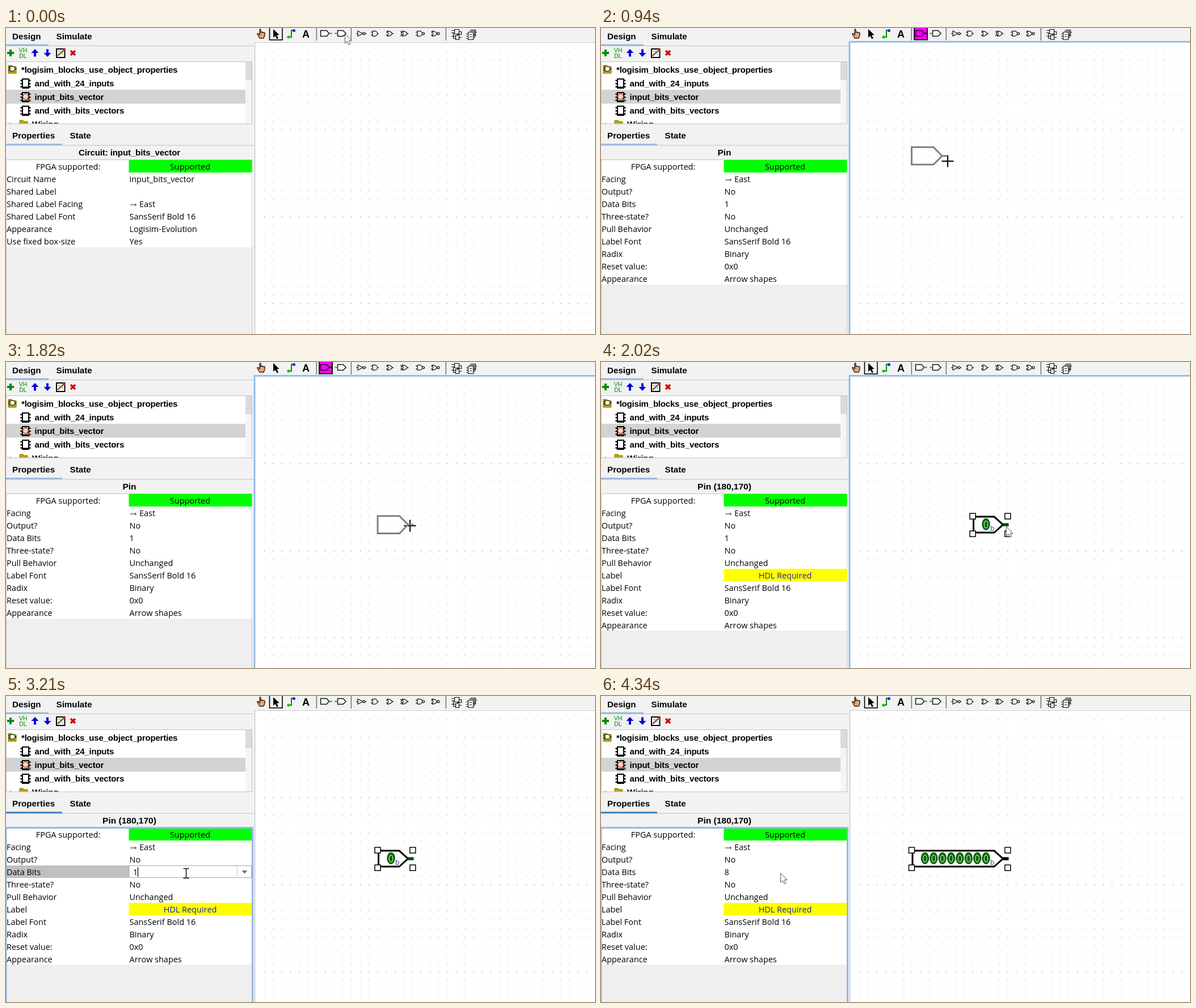
Recreate the animation shown at these times as an HTML page with a canvas. Size 1038 px wide and 540 px high, loop 6340 ms.

```html
<!DOCTYPE html>
<html lang="en">
<head>
<meta charset="utf-8">
<title>Pin data bits</title>
<style>
html, body { margin: 0; width: 100%; height: 100%; overflow: hidden; background: #f2f2f2; }
canvas { display: block; }
</style>
</head>
<body>
<canvas id="stage" width="1038" height="540"></canvas>
<script>
const c = document.getElementById('stage').getContext('2d');
const LOOP = 6340, GRID = 15.36, OX = 440, OY = 26, ROW = 21.95;
const PANEL = '#f2f2f2', LINE = '#c2c2c2', FOCUS = '#8fb9e6', GREEN = '#00c800';
const BOLD = '"Liberation Sans", Arial, sans-serif';
const BODY = '14.45px "Open Sans", "Noto Sans", sans-serif';

// Times of the state changes
const T = { hover: 430, tool: 480, enter: 810, place: 1950, arrow: 2020,
  focus: 3140, edit: 3210, erase: 3690, type: 4020, commit: 4280, done: 4340 };

// Pointer positions: time, x, y
const POINTER = [
  [0, 597, 10], [80, 588, 9], [150, 576, 7], [210, 567, 6], [280, 563, 4.5],
  [750, 564, 20], [810, 572, 78], [880, 590, 160], [940, 611, 235], [1010, 621, 268],
  [1080, 626, 282], [1150, 628, 288], [1220, 628, 289], [1290, 627, 289], [1360, 626, 289],
  [1500, 630, 289], [1570, 640, 289], [1630, 658, 289], [1700, 678, 289], [1760, 697, 289],
  [1820, 712, 289], [1890, 714, 290],
  [2610, 705, 291], [2680, 660, 295], [2740, 590, 301], [2810, 500, 308], [2880, 410, 314],
  [2940, 345, 318], [3010, 324, 315], [3080, 317, 313], [4280, 316, 312]
];

const CIRCUIT = [['Circuit Name', 'input_bits_vector'], ['Shared Label', ''],
  ['Shared Label Facing', '> East'], ['Shared Label Font', 'SansSerif Bold 16'],
  ['Appearance', 'Logisim-Evolution'], ['Use fixed box-size', 'Yes']];

function pinRows(placed, bits) {
  const rows = [['Facing', '> East'], ['Output?', 'No'], ['Data Bits', bits],
    ['Three-state?', 'No'], ['Pull Behavior', 'Unchanged']];
  if (placed) rows.push(['Label', 'HDL Required']);
  return rows.concat([['Label Font', 'SansSerif Bold 16'], ['Radix', 'Binary'],
    ['Reset value:', '0x0'], ['Appearance', 'Arrow shapes']]);
}

function box(x, y, w, h, fill) {
  c.fillStyle = fill;
  c.fillRect(x, y, w, h);
}
function frame(x, y, w, h, color, width = 1) {
  c.strokeStyle = color;
  c.lineWidth = width;
  c.strokeRect(x, y, w, h);
}
function text(s, x, y, font = BODY, color = '#000', align = 'left', gap = 0) {
  c.font = font;
  c.fontKerning = 'none';
  c.fillStyle = color;
  c.textAlign = align;
  c.letterSpacing = gap + 'px';
  c.fillText(s, x, y);
}
function shape(d, stroke, width = 1, fill, x = 0, y = 0) {
  const p = new Path2D(d);
  c.save();
  c.translate(x, y);
  if (fill) { c.fillStyle = fill; c.fill(p); }
  if (stroke) { c.strokeStyle = stroke; c.lineWidth = width; c.stroke(p); }
  c.restore();
}
function disc(x, y, rx, ry, fill, stroke, width = 1) {
  c.beginPath();
  c.ellipse(x, y, rx, ry, 0, 0, 7);
  if (fill) { c.fillStyle = fill; c.fill(); }
  if (stroke) { c.strokeStyle = stroke; c.lineWidth = width; c.stroke(); }
}

function chip(x, y) {
  for (const k of [2, 7.5, 13]) box(x - 2.5, y + k, 18, 2.4, '#000');
  box(x, y - .5, 13, 18, '#000');
  box(x + 2, y + 1.5, 9, 12.5, '#fff');
}

function editBar() {
  shape('M8 38V50M2 44H14', '#008a00', 4);
  const small = '10.5px ' + BOLD;
  text('VH', 30, 43, small, '#008a00', 'center');
  text('DL', 30, 52.5, small, '#008a00', 'center');
  shape('M0 -7L6.5 0H2V6.5H-2V0H-6.5Z', null, 1, '#0000e0', 51, 44);
  shape('M0 7L6.5 0H2V-6.5H-2V0H-6.5Z', null, 1, '#0000e0', 73, 44);
  box(89, 37, 14.5, 15, '#fff');
  frame(89, 37, 14.5, 15, '#000', 2);
  shape('M91 49L102 39', '#7a5a30', 2.4);
  shape('M91 41Q97 40 100 48', '#60a060', 1);
  shape('M101 37L104 40', '#e02020', 2.5);
  shape('M114 40L122 48M122 40L114 48', '#d40000', 3.6);
}

function tree() {
  box(0, 59, 434, 110, '#fff');
  c.save();
  c.beginPath();
  c.rect(0, 59, 422, 110);
  c.clip();
  box(0, 109, 422, 24.5, '#d3d3d3');
  const font = 'bold 15px ' + BOLD;
  shape('M4 66H10L12 68H18V80H4Z', '#8a7a00', 1, '#b8a400');
  shape('M7 68H12A4 4 0 0 1 12 76H7ZM16 72H19M4 70H7M4 74H7', '#000', 1.2, '#fff');
  text('*logisim_blocks_use_object_properties', 27, 79, font, '#000', 'left', -.2);
  ['and_with_24_inputs', 'input_bits_vector', 'and_with_bits_vectors'].forEach((name, i) => {
    const y = 89.5 + 24 * i;
    chip(28, y);
    text(name, 50.5, y + 13.5, font, '#000', 'left', -.2);
  });
  disc(34.5, 121, 5, 5, '#f3d6c4', '#a0522d', 1.5);
  shape('M38 125L43 130', '#a0522d', 2.5);
  shape('M7 167L11 171', '#999', 1.3);
  shape('M24 163H30L32 165H38V176H24Z', '#8a7a00', 1, '#b8a400');
  text('Wiring', 46, 175, font);
  c.restore();
  box(422, 60, 11, 109, '#f5f5f5');
  box(422, 60, 11, 32, '#dbdbdb');
  frame(.5, 59.5, 433, 109.5, LINE);
}

function tabs(names, y, width, color) {
  box(0, y + 16.5, 437, 1, LINE);
  box(0, y + 14.2, width, 3, color);
  const font = 'bold 15.2px ' + BOLD;
  names.forEach(([s, x]) => text(s, x, y + 5.4, font));
}

function value(s, x, y) {
  if (s[0] === '>') {
    shape('M0 0H10.5M8 -2.3L10.5 0L8 2.3', '#222', 1, null, x + 1.5, y - 3.9);
    s = s.slice(2);
    x += 17.5;
  }
  text(s, x, y);
}

const rowTop = i => Math.round(233 + ROW * i);

function table(t) {
  const placed = t >= T.place, pin = t >= T.tool;
  const focused = t >= T.focus && (t < T.commit || t >= T.done);
  tabs([['Properties', 11], ['State', 112.5]], 190, 99, focused ? '#4083c9' : '#99badd');
  const title = placed ? 'Pin (180,170)' : pin ? 'Pin' : 'Circuit: input_bits_vector';
  text(title, 217.5, 225, `bold ${pin ? 15.5 : 15}px ` + BOLD, '#000', 'center', pin ? 0 : -.1);
  const rows = pin ? pinRows(placed, t >= T.commit ? '8' : '1') : CIRCUIT;
  box(0, 233, 434, 307, '#efefef');
  frame(.5, 232.5, 433, 320, LINE);
  box(1, 233, 432.5, rowTop(rows.length + 1) - 233, '#fff');
  box(216.5, 233, 217, 22, '#00ff00');
  text('FPGA supported:', 109.5, 250, BODY, '#000', 'center');
  text('Supported', 324.5, 250, BODY, '#000', 'center');
  const editing = t >= T.edit && t < T.commit;
  rows.forEach(([name, val], i) => {
    const y = 250 + ROW * (i + 1), top = rowTop(i + 1);
    if (editing && name === 'Data Bits') {
      box(1, top, 216, 22, '#c0c0c0');
      editor(t, y, top);
    } else if (name === 'Label') {
      box(216.5, top, 217, 22, '#ffff00');
      text(val, 324.5, y, BODY, '#1d1dc8', 'center');
    } else value(val, 217.5, y);
    text(name, 1, y);
  });
  if (focused) {
    box(0, 231, 436, 3, FOCUS);
    box(0, 231, 1.5, 309, FOCUS);
    box(433, 231, 3, 309, FOCUS);
  }
}

function editor(t, y, top) {
  box(217, top, 216, 22, '#fff');
  frame(217, top + .5, 215.5, 21, '#87afda');
  box(407, top + 1, 1, 20, '#b8cfe6');
  shape('M-5 -2.5H5L0 3Z', null, 1, '#6e6e6e', 420.5, top + 11.5);
  const s = t < T.erase ? '1' : t < T.type ? '' : '8';
  text(s, 224, y);
  box(s ? 231.8 : 224.5, y - 13.5, 1.3, 16.5, '#000');
}

function inputIcon(t) {
  let line = '#111', wire = GREEN, fill = '#fff';
  if (t >= T.hover && t < T.tool) {
    box(552.5, 0, 22, 21, '#cfc63a');
    line = '#66621c'; fill = '#a59d30'; wire = '#7ea020';
  } else if (t >= T.tool && t < T.place) {
    box(552, 0, 23, 21, '#ff00ff');
    frame(552, -2, 23, 22.7, '#000', 1.8);
    fill = '#ff00ff'; wire = line;
  }
  shape('M554.5 4.5H565L569.5 9.5L565 14.5H554.5Z', line, 1.5, fill);
  shape('M569.5 9.5H574.5', wire, 2.2);
}

function gates() {
  const and = 'M0 -4.5H4A4.5 4.5 0 0 1 4 4.5H0ZM-3 -2.5H0M-3 2.5H0M8.5 0H11';
  const or = 'M0 -4.5Q6 -4.5 9 0Q6 4.5 0 4.5Q3 0 0 -4.5ZM-2 -2.5H1M-2 2.5H1M9 0H11';
  const draw = (d, x) => shape(d, '#111', 1.2, null, x, 9.8);
  draw('M0 -4.5V4.5L9 0ZM-3 0H0M13 0H15', 620);
  draw(and, 646);
  draw(or, 672);
  draw(or, 698.5);
  draw('M-3 -4.5Q0 0 -3 4.5', 698.5);
  draw(and, 725);
  draw(or, 751);
  for (const x of [631, 735.5, 762]) disc(x, 9.8, 2, 2, PANEL, '#111', 1.2);
}

function toolbar(t) {
  box(438, 0, 600, 25, PANEL);
  shape('M447 18L443 11Q442 9 445 10L447 12V3Q448 1 449 3V8L451 7L453 8L455 8Q457 9 456 13L454 18Z',
    '#3a2010', 1.4, '#dca878');
  if (t < T.tool || t >= T.place) frame(464.5, -2, 22.5, 23, '#000', 1.6);
  shape('M471 2V17L474.5 14L477.5 19.5L480 18L477 13L481.5 12Z', null, 1, '#000');
  shape('M498 16H503V4H508', '#108010', 2);
  disc(498, 16, 2.6, 2.6, GREEN);
  disc(507.5, 4.5, 2.6, 2.6, '#1030ff');
  text('A', 528.5, 16.5, 'bold 18px ' + BOLD, '#000', 'center');
  for (const x of [546.5, 607.5, 774.5]) box(x, 0, 1.6, 22, '#777');
  inputIcon(t);
  shape('M584.5 4.5H594L599 9.5L594 14.5H584.5Z', '#111', 1.5, '#fff');
  shape('M579.5 9.5H584.5', GREEN, 2.2);
  gates();
  shape('M790.5 2.5H798.5V10.5H790.5ZM792.5 13H798.5V20.5H792.5ZM785 4.5H790M785 8.5H790M788.5 8.5V18.5H792M785 14.5H792M799 6.5H802.5V11.5H795.5V13M799 16.5H803',
    '#111', 1.2);
  shape('M818.5 3.5H827.5V15M816.5 5.5H825.5V18M827 7.5H830', '#111', 1.2);
  shape('M814.5 7.5H823.5V20.5H814.5ZM811 10.5H814M811 14.5H814M811 18.5H814M823 12.5H827M817 11.5H821M817 15.5H821',
    '#111', 1.2, '#fff');
}

function canvasArea(t) {
  box(438, 24, 600, 516, '#fff');
  for (let j = 1; j < 34; j++) {
    const shade = j % 10 ? '#999' : '#555';
    for (let i = 1; i < 40; i++) {
      box(Math.floor(OX + i * GRID), Math.floor(OY + j * GRID), 1, 1, shade);
    }
  }
  if (t >= T.hover && t < T.focus) {
    box(437, 23, 601, 2.7, FOCUS);
    box(436.6, 23, 2.8, 517, FOCUS);
  } else {
    box(438, 25, 600, 1, LINE);
    box(438, 25, 1.2, 515, LINE);
  }
}

function ghost(px, py) {
  const x = OX + Math.round((px - OX) / GRID) * GRID;
  const y = OY + Math.floor((py - OY) / GRID) * GRID;
  shape('M-61.5 -15.4H-23L-8 0L-23 15.4H-61.5ZM-8 0H1.5', '#808080', 3, null, x, y);
}

function placedPin(bits) {
  const x = OX + 18 * GRID, y = OY + 17 * GRID, extra = (bits - 1) * GRID;
  shape(`M${-60 - extra} -14H-23.5L-8 0L-23.5 14H${-60 - extra}Z`, '#000', 3, '#fff', x, y);
  shape('M-8 0H2', bits > 1 ? '#000' : '#00500a', 5.5, null, x, y);
  for (let i = 0; i < bits; i++) {
    const cx = x - 38 - i * GRID;
    disc(cx, y - .8, 7.2, 10.6, '#006400');
    disc(cx, y - .3, 3.2, 6.2, null, '#e6f0e6', 1.2);
  }
  text('b', x - 30.5, y + 11, '13px ' + BOLD, '#4646c0');
  for (const hx of [x - 61.5 - extra, x + .3]) {
    for (const hy of [y - 15, y + 16]) {
      box(hx - 5, hy - 5, 10, 10, '#fff');
      frame(hx - 5, hy - 5, 10, 10, '#000', 1.5);
    }
  }
}

function pointer(t, x, y) {
  if (t >= T.enter && t < T.arrow) {
    shape('M-10.5 0H10.5M0 -10.5V10.5', '#000', 2, null, x, y);
  } else if (t >= T.focus && t < T.commit) {
    shape('M-5 -8.5H-1.5L0 -7.5L1.5 -8.5H5M0 -7.5V7.5M-5 8.5H-1.5L0 7.5L1.5 8.5H5', '#000', 1.4, null, x + .5, y);
  } else {
    shape('M.5 .5V17L4.3 13.5L7 19.5L9.8 18.3L7.2 12.4H12Z', '#555', 1, '#fff', x, y);
  }
}

function draw(t) {
  box(0, 0, 1038, 540, PANEL);
  tabs([['Design', 11], ['Simulate', 88.5]], 14.5, 75, '#99badd');
  editBar();
  tree();
  table(t);
  toolbar(t);
  canvasArea(t);
  const [, x, y] = POINTER.findLast(p => p[0] <= t);
  if (t >= T.place) placedPin(t >= T.commit ? 8 : 1);
  // The crosshair lies under the outline it carries
  pointer(t, x, y);
  if (t >= T.enter && t < T.place) ghost(x, y);
}

const start = performance.now();
function tick() {
  draw((performance.now() - start) % LOOP);
  requestAnimationFrame(tick);
}
tick();
</script>
</body>
</html>
```
